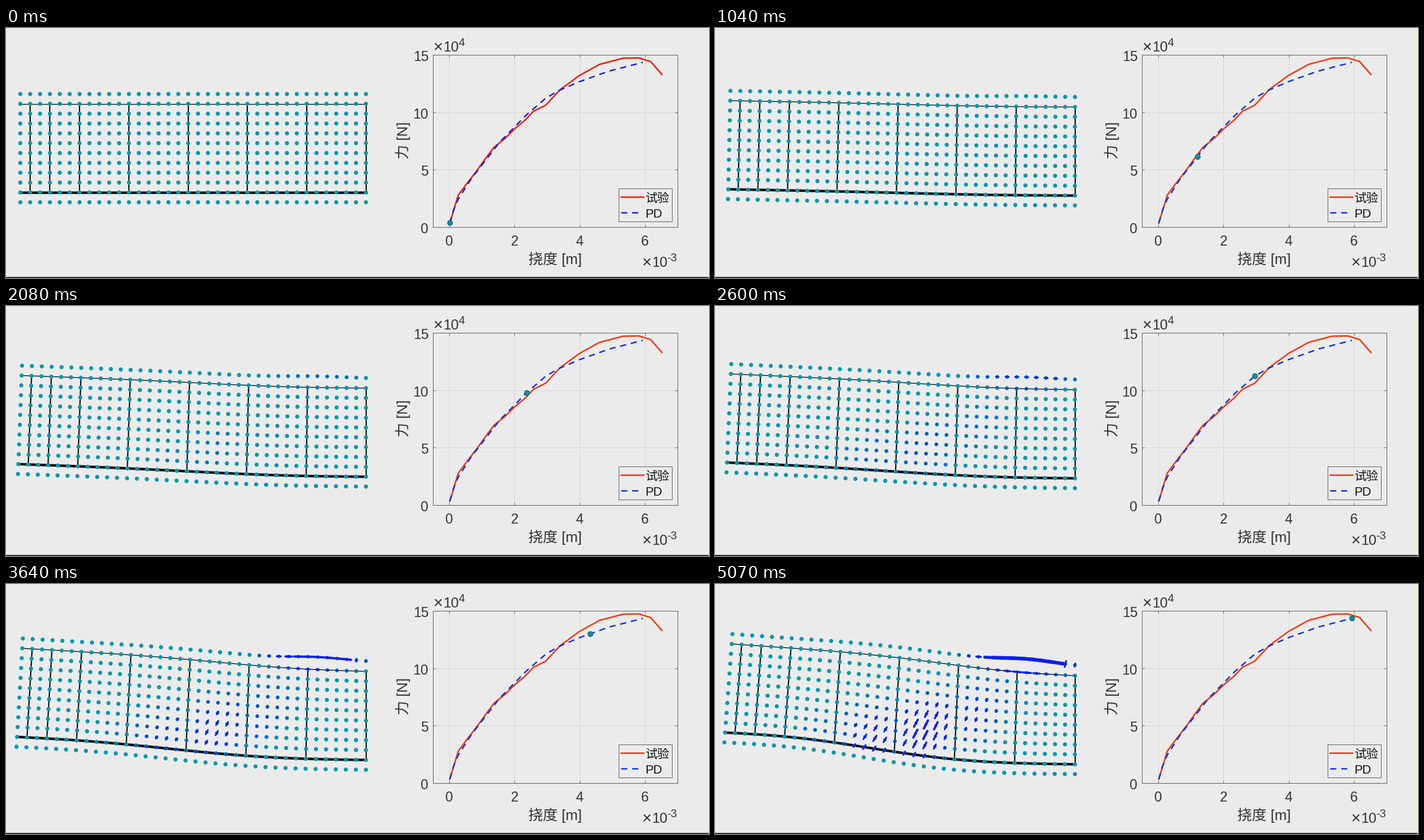
Animation, 1253 px wide and 447 px high, one loop 5.14 s. Source, as a matplotlib script:

```python
import matplotlib.pyplot as plt
import numpy as np
from matplotlib.animation import FuncAnimation
from matplotlib.collections import LineCollection
from matplotlib.patches import Rectangle

W, H = 1253, 447
STEP, LAST, FRAMES, INTERVAL = 260, 5070, 257, 20
BG, INK, EDGE = "#ebebeb", "#333333", "#5a5a5a"
TEAL, BLUE = np.array([8, 152, 170]) / 255, np.array([10, 32, 235]) / 255

plt.rcParams["font.family"] = ["Liberation Sans", "Noto Sans CJK JP"]
plt.rcParams["lines.scale_dashes"] = False
# One point equals one pixel at 72 dpi
fig = plt.figure(figsize=((W + 0.01) / 72, (H + 0.01) / 72), dpi=72, facecolor=BG)
ax = fig.add_axes([0, 0, 1, 1])
ax.set(xlim=(0, W), ylim=(H, 0))
ax.axis("off")


def line(x, y, color, lw, z=2, **kw):
    return ax.plot(x, y, color=color, lw=lw, zorder=z, **kw)[0]


def label(x, y, s, size=24.5, ha="center", va="center_baseline", color=INK, **kw):
    ax.text(x, y, s, fontsize=size, ha=ha, va=va, color=color, zorder=6, **kw)


def box(x0, y0, x1, y1, z, fill=BG):
    ax.add_patch(Rectangle((x0, y0), x1 - x0, y1 - y0, fc=fill, ec=EDGE, lw=1, zorder=z))


# Stage borders
line([0, W], [446, 446], "black", 1.6)
line([1252.4] * 2, [0, 445], "#fbfbb0", 1.4)

# Chart
X0, X1, Y0, Y1 = 761, 1197, 48.5, 356
box(X0, Y0, X1, Y1, 2, "none")
for v in range(0, 7, 2):
    x = 790 + 58.17 * v
    line([x, x], [Y0, Y1], "#d4d4d4", 1, 1)
    for a, b in ((Y1, Y1 - 4), (Y0, Y0 + 4)):
        line([x, x], [a, b], EDGE, 1)
    label(x, 379.5, str(v))
for v in range(0, 16, 5):
    y = Y1 - 20.5 * v
    line([X0, X1], [y, y], "#d4d4d4", 1, 1)
    for a, b in ((X0, X0 + 4), (X1, X1 - 4)):
        line([a, b], [y, y], EDGE, 1)
    label(753, y + 1, str(v), ha="right")
for x, y, power in ((763, 42, "4"), (1135, 427, "-3")):
    label(x - 1, y + 1, "×", 29, "left", "baseline")
    label(x + 16, y, "10", 25, "left", "baseline")
    label(x + 43, y - 10.5, power, 20, "left", "baseline")
label(979, 422, "挠度 [m]", 26, va="baseline")
label(708, 201, "力 [N]", 26, va="center", rotation=90)

test = np.array([
    (791, 349), (806, 299), (820, 280), (840, 254), (855, 233), (870, 213),
    (890, 197), (907, 180), (925, 165), (940, 149), (962, 138), (988, 110),
    (1022, 85), (1058, 65), (1100, 54), (1128, 53.5), (1149, 60), (1169, 83)]).T
model = np.array([
    (791, 349), (798, 325), (806, 306), (829, 270), (880, 204), (927, 156),
    (962, 125.5), (985, 112), (1022, 96), (1075, 77), (1135, 61.5)]).T
DASH = dict(ls=(0, (11, 8.5)), dash_capstyle="butt")
red = [line(*test, "red", 2.7, 4)]
blue = [line(*model, "blue", 2.5, 4, **DASH)]

box(1092, 287, 1187, 346, 5)
red.append(line([1096, 1136], [302, 302], "red", 2.7, 6))
blue.append(line([1096, 1132], [330, 330], "blue", 2.5, 6, **DASH))
label(1140, 303, "试验", 21.5, "left", color="#111111")
label(1139, 331, "PD", 22, "left", color="#111111")
marker, = ax.plot([], [], "o", ms=9, mfc="#10909c", mec="#1c5f78", mew=1.2, zorder=7)

# Beam grid: 12 rows by 36 columns of particles
ROWS, COLS, PITCH = 12, 36, 17.6
STIFF = [1, 3, 6, 11, 17, 23, 29, 35]
R, C = np.mgrid[:ROWS, :COLS].astype(float)
GX, GY = 25.5 + PITCH * C, 118 + PITCH * R
XI = C / (COLS - 1)
DEPTH = (R - 1) / 9


def bend(*coefs):
    """Straight slope from -1 to 1 plus a short sine series."""
    return 2 * XI - 1 + sum(a * np.sin((k + 1) * np.pi * XI) for k, a in enumerate(coefs))


ELASTIC = bend(.185, -.115, .02)
PLASTIC = bend(-.05, -.105, .035) * (1 - DEPTH) + bend(.225, -.2, -.03) * DEPTH
BULGE = 6.5 * np.exp(-((C - 30) / 4) ** 2) * (R == 0)


def deform(load, plastic):
    dy = 28.4 * load * (ELASTIC + plastic * (PLASTIC - ELASTIC)) - load * BULGE
    dx = (4.3 * load ** .6 * (1 - XI ** 5) * (1 - DEPTH)
          - 7.5 * load ** .85 * (1 - XI ** 1.6) * DEPTH)
    return GX + dx, GY + dy


# Web: a diagonal band of strain, weaker beside each stiffener
panel = np.interp(C, STIFF, range(len(STIFF))) % 1
hump = .25 + .75 * np.sin(np.pi * panel) ** .7
ridge = 9.3 - ((C - 10) / 7.5) ** 2
band = np.exp(-((R - ridge) / 2.7) ** 2 - ((C - 19) / 7) ** 2)
length = 17 * hump * band * ((R > 1) & (R < 11))
angle = np.radians(43 + C)
# Flange: strokes along the two upper rows, tilted at the outer end
length[0] = 27 * np.clip((C[0] - 21.5) / 6.5, 0, 1) ** 2
length[0, 34:] = 11, 7
length[1] = 14 * np.exp(-((C[1] - 29.5) / 3.4) ** 2)
strength = np.clip(length / 17, 0, 1)
along = (R < 2) & ((R == 1) | (C < 34))
thick = np.where(along & (R == 0), 5.0, 2.9)

chord_top = line([], [], "black", 1.3)
chord_bottom = line([], [], "#0a0a0a", 4.5)
ribs = [line([], [], "#0a0a0a", 2.2) for _ in STIFF]
dots = ax.scatter(GX.ravel(), GY.ravel(), s=7.4 ** 2, lw=0, zorder=3)
strokes = LineCollection([], colors=[BLUE], capstyle="round", zorder=4)
ax.add_collection(strokes)


def draw(k):
    t = k * INTERVAL // STEP * STEP
    if (k + 1) * INTERVAL > LAST:
        t = LAST
    travel = np.interp(t, [0, 2600, 3640, LAST], [0, 171, 249.5, 344])
    plastic = max(0, (t - 1800) / (LAST - 1800))

    px, py = deform(travel / 344, plastic)
    chord_top.set_data(px[1], py[1])
    chord_bottom.set_data(px[10], py[10])
    for rib, c in zip(ribs, STIFF):
        rib.set_data(px[1:11, c], py[1:11, c])

    g = strength * plastic
    mix = np.clip(1.2 * g, 0, .85).ravel()[:, None]
    dots.set_offsets(np.column_stack([px.ravel(), py.ravel()]))
    dots.set_facecolors(TEAL * (1 - mix) + BLUE * mix)
    dots.set_sizes(((7.4 - 2.6 * g) ** 2).ravel())

    tangent = -np.arctan2(np.gradient(py, axis=1), np.gradient(px, axis=1))
    a = np.where(along, tangent, angle)
    half = length * plastic / 2
    ux, uy = half * np.cos(a), -half * np.sin(a)
    on = g > .05
    ends = [np.stack([px + s * ux, py + s * uy], -1) for s in (-1, 1)]
    strokes.set_segments(list(np.stack(ends, -2)[on]))
    strokes.set_linewidths((1.4 + thick * g)[on])

    x = 791.3 + travel
    marker.set_data([x], [np.interp(x, *model)])
    for lines, start, later in ((red, "#f02010", "#ee3d18"), (blue, "#1020d8", "#0a32dc")):
        for ln in lines:
            ln.set_color(later if t else start)
    return [dots, strokes, marker, chord_top, chord_bottom, *ribs, *red, *blue]


anim = FuncAnimation(fig, draw, frames=FRAMES, interval=INTERVAL,
                     repeat=True, repeat_delay=0, blit=False)
plt.show()
```
